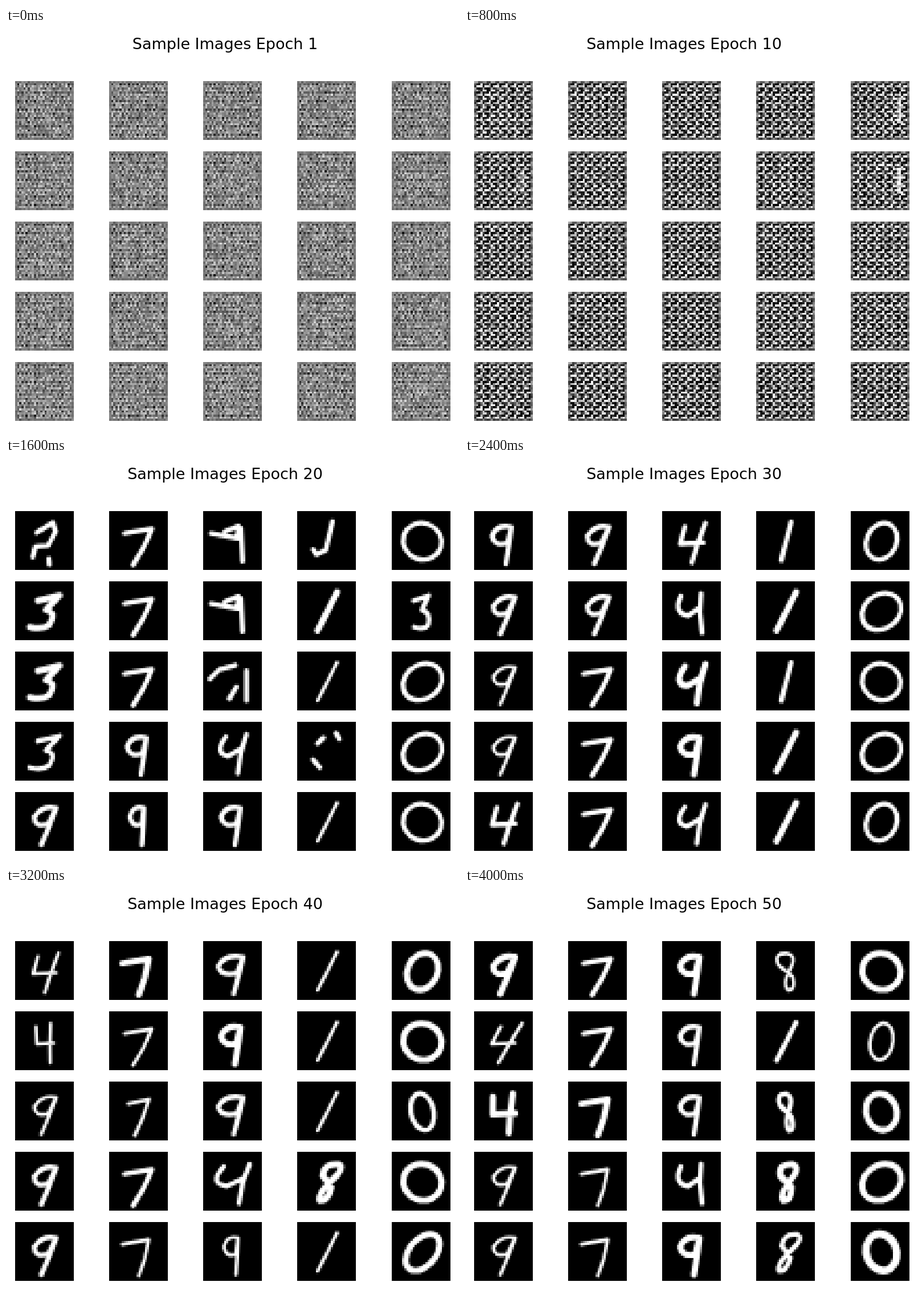
Recreate the animation shown at these times as an HTML page with a canvas. Size 795x704 px, loop 4800 ms.

```html
<!DOCTYPE html>
<html lang="en">
<head>
<meta charset="utf-8">
<style>
html, body { margin: 0; width: 795px; height: 704px; overflow: hidden; background: #fff; }
canvas { display: block; }
</style>
</head>
<body>
<canvas id="stage" width="795" height="704"></canvas>
<script>
const ctx = document.getElementById('stage').getContext('2d');
const tile = document.createElement('canvas');
tile.width = tile.height = 28;
const pen = tile.getContext('2d', { willReadFrequently: true });

const HOLD = 800, SIZE = 103, MID = 54;

// Handwritten shapes on a tile of SIZE pixels
const glyphs = {
  0: 'M68 23A26 33 25 0 1 40 83A26 33 25 0 1 68 23Z',
  1: 'M70 19L36 86',
  2: 'M38 38L66 20 71 36 58 60 36 62 31 80M59 83L60 93',
  3: 'M40 34L78 25 54 50Q74 54 60 76 48 86 26 80',
  4: 'M40 27L32 57 72 55M76 21L62 58 52 90',
  7: 'M27 39L75 31 60 64 42 94',
  8: 'M64 22Q38 20 42 42L62 62Q62 86 48 86 38 76 66 42 76 26 64 22',
  9: 'M72 28Q48 22 34 44 34 62 58 56L72 28 62 54 46 92',
  u: 'M40 26Q18 56 44 60L68 46M76 22L66 54 61 90',
  y: 'M14 39L60 47 62 26 38 36M66 30L69 88',
  j: 'M62 18L50 68 34 76 28 67',
  c: 'M68 20L74 30M46 28L36 38M28 66L40 80',
  k: 'M12 48L28 32 56 24M76 34L76 86M58 62L46 82'
};

// Marks: + bold, - thin, < narrow, > wide, | upright, / slanted
const epochs = [
  { number: 1 },
  { number: 10 },
  { number: 20, rows: ['2 7 y j 0>|', '3+ 7 y 1+ 3<|', '3+ 7 k 1- 0>', '3 9| u c 0>', '9 9|< 9| 1- 0>|'] },
  { number: 30, rows: ['9| 9 4 1| 0', '9 9 u| 1+ 0>', '9- 7 u+ 1| 0>|', '9- 7 9|+ 1+ 0>', '4 7 u 1+ 0'] },
  { number: 40, rows: ['4- 7|+ 9|> 1- 0+', '4-<| 7- 9|+ 1- 0>|+', '9- 7-< 9|> 1- 0<|', '9 7 u> 8+/ 0>|+', '9 7-| 9|-< 1- 0/+'] },
  { number: 50, rows: ['9+ 7 9|+ 8-| 0>|+', '4-/ 7 9| 1 0<-', '4+| 7|+ 9| 8<| 0+|', '9- 7-| u| 8+ 0>+', '9- 7-| 9|+ 8/ 0++|'] }
];

// 4 x 4 weave that repeats under the noise of the early epochs
const weaves = {
  1: [[.3, .5, -.2, .4], [.2, -.9, .1, -.5], [.6, -.1, .6, .1], [-.2, .4, -.6, .3]],
  10: [[.9, .8, -.7, -.6], [-.7, -.9, -.9, .7], [-.8, .6, .9, .8], [.7, -.6, -.9, -.3]]
};
const smears = { 4: 150, 9: 190, 5: 80 };

function random(seed) {
  return () => {
    seed = seed + 0x6D2B79F5 | 0;
    let t = Math.imul(seed ^ seed >>> 15, seed | 1);
    t ^= t + Math.imul(t ^ t >>> 7, t | 61);
    return ((t ^ t >>> 14) >>> 0) / 4294967296;
  };
}

function drawNoise(epoch, index) {
  const rnd = random(epoch * 100 + index);
  const early = epoch === 1;
  const [mean, gain, grain] = early ? [128, 75, 95] : [116, 120, 110];
  const smear = !early && smears[index] || 0;
  for (let y = 0; y < 28; y++) for (let x = 0; x < 28; x++) {
    const inside = Math.min(x, y, 27 - x, 27 - y) > 0;
    let v = weaves[epoch][y % 4][x % 4] * gain + (rnd() - .5) * grain;
    v = inside ? mean + v : mean - 12 + v * .4;
    if (x > 21 && x < 24 && y > 7 && y < 20) v += smear;
    v = Math.max(8, Math.min(248, Math.round(v)));
    pen.fillStyle = `rgb(${v},${v},${v})`;
    pen.fillRect(x, y, 1, 1);
  }
}

function drawDigit([name, ...marks]) {
  const count = mark => marks.filter(m => m === mark).length;
  const stretch = 1 + .25 * (count('>') - count('<'));
  const slant = .25 * (count('/') - count('|'));
  const shape = new Path2D();
  shape.addPath(new Path2D(glyphs[name]),
    new DOMMatrix([stretch, 0, -slant, 1, MID * (1 - stretch + slant), 0]));

  pen.fillStyle = '#000';
  pen.fillRect(0, 0, 28, 28);
  pen.save();
  pen.scale(28 / SIZE, 28 / SIZE);
  pen.strokeStyle = '#fff';
  pen.lineCap = pen.lineJoin = 'round';
  pen.lineWidth = 8.5 + 2.5 * (count('+') - count('-'));
  pen.stroke(shape);
  pen.restore();
}

function draw({ number, rows }) {
  ctx.fillStyle = '#fff';
  ctx.fillRect(0, 0, 795, 704);
  ctx.fillStyle = '#000';
  ctx.font = '27px "DejaVu Sans", sans-serif';
  ctx.textAlign = 'center';
  ctx.fillText('Sample Images Epoch ' + number, 384.5, 36.6);
  ctx.imageSmoothingEnabled = false;
  const digits = rows && rows.join(' ').split(' ');
  for (let i = 0; i < 25; i++) {
    if (digits) drawDigit(digits[i]);
    else drawNoise(number, i);
    const x = Math.round(16 + 165.15 * (i % 5));
    const y = Math.round(93 + 123.1 * Math.floor(i / 5));
    ctx.drawImage(tile, x, y, SIZE, SIZE);
  }
}

let shown = -1;
function tick() {
  const step = Math.floor(performance.now() / HOLD) % epochs.length;
  if (step !== shown) draw(epochs[shown = step]);
  requestAnimationFrame(tick);
}
tick();
</script>
</body>
</html>
```
